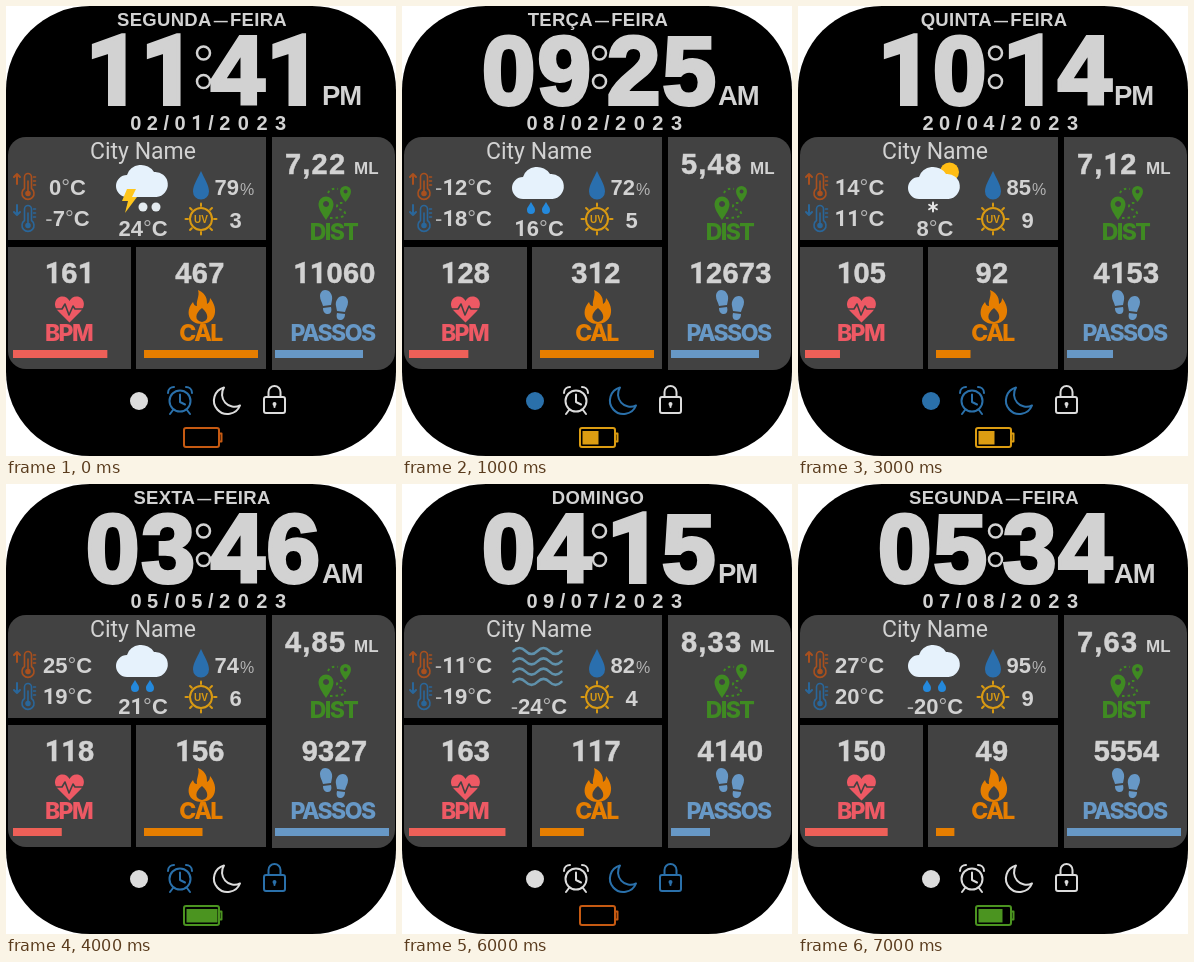
An HTML page that plays this animation: 390 px wide and 450 px high, repeating every 8 s.

```html
<!DOCTYPE html>
<html lang="pt">
<head>
<meta charset="utf-8">
<title>Watch face</title>
<style>
html, body { margin: 0; width: 100%; height: 100%; overflow: hidden; background: #fff; }
svg { display: block; width: 390px; height: 450px; }
text { font: bold 22px "Liberation Sans", Arial, sans-serif; fill: #d2d2d2; font-kerning: none; white-space: pre; }
.mid { text-anchor: middle; }
.one { font-family: Roboto, sans-serif; }
.thin { font-weight: 400; fill: #b4b4b4; }
.ask { font: 500 35px Roboto, sans-serif; }
.big { font-size: 96px; letter-spacing: 2px; stroke: #d2d2d2; stroke-width: 4px; }
.big .one, .num .one { letter-spacing: 0; }
.num { font-size: 29px; letter-spacing: .3px; stroke: #d2d2d2; stroke-width: .5px; }
.day { font-size: 18.5px; letter-spacing: .3px; font-kerning: normal; }
.dash { font-size: 14px; }
.date { font-size: 20px; letter-spacing: 5.5px; }
.year { letter-spacing: 7.5px; }
.cap { font: 800 23px Inter, sans-serif; letter-spacing: -1.6px; }
.line { fill: none; stroke-width: 2; stroke-linecap: round; stroke-linejoin: round; }
.panel { fill: #424242; }
</style>
</head>
<body>
<svg viewBox="0 0 390 450">
  <rect width="390" height="450" rx="84"/>
  <g class="panel">
    <path d="M20 131H260V234H2V149a18 18 0 0 1 18-18z"/>
    <path d="M2 241H125V363H20a18 18 0 0 1-18-18z"/>
    <path d="M130 241H260V363H130z"/>
    <path d="M266 131H371a18 18 0 0 1 18 18V346a18 18 0 0 1-18 18H266z"/>
  </g>

  <text id="day" class="day mid" x="196" y="20"></text>
  <text id="hour" class="big" x="80" y="98"></text>
  <text id="minute" class="big" x="205" y="98"></text>
  <g class="line" stroke="#d2d2d2" style="stroke-width:2.5">
    <circle cx="197.5" cy="47" r="6.5"/>
    <circle cx="197.5" cy="75.5" r="6.5"/>
  </g>
  <text id="half" x="316" y="99" style="font-size:27.5px;letter-spacing:-1px"></text>
  <text id="date" class="date mid" x="206" y="124"></text>

  <text class="mid" x="137" y="153" style="font:400 23px Roboto,sans-serif">City Name</text>
  <g class="line" stroke="#a9501e" style="stroke-width:1.6">
    <path d="M18.500 182.500V171a3.500 3.500 0 0 1 7 0V182.500a6 6 0 1 1-7 0z"/>
    <path d="M22 175V187M27.500 171h2M27.500 175h2M27.500 179h2"/>
    <circle cx="22" cy="187.500" r="2" fill="#a9501e"/>
    <path d="M11 178V168M8 171l3-3 3 3" stroke-width="2"/>
  </g>
  <g class="line" stroke="#2a6699" style="stroke-width:1.6">
    <path d="M18.500 214.500V203a3.500 3.500 0 0 1 7 0V214.500a6 6 0 1 1-7 0z"/>
    <path d="M22 207V219M27.500 203h2M27.500 207h2M27.500 211h2"/>
    <circle cx="22" cy="219.500" r="2" fill="#2a6699"/>
    <path d="M11 199V209M8 206l3 3 3-3" stroke-width="2"/>
  </g>
  <text id="high" class="mid"></text>
  <text id="low" class="mid"></text>
  <g id="sky"></g>
  <text id="now" class="mid"></text>

  <path d="M195 165C198 172 203 179 203 185.500a8 8 0 0 1-16 0C187 179 192 172 195 165z" fill="#2a6fae"/>
  <text id="humid" x="208.500" y="188.500"></text>
  <g id="sun" class="line" stroke="#d99a12"><circle cx="195" cy="213" r="11"/></g>
  <text class="mid" x="195" y="216.500" style="font-size:10px;fill:#d99a12">UV</text>
  <text id="uv" class="mid" x="229.500" y="222"></text>

  <text id="dist" class="num" x="279" y="168" style="letter-spacing:1.2px"></text>
  <text x="348" y="168" style="font-size:17px">ML</text>
  <g fill="#3f8a22" fill-rule="evenodd">
    <path d="M320 214c-4-6-7.500-11-7.500-16a7.500 7.500 0 0 1 15 0c0 5-3.500 10-7.500 16zm0-19a3 3 0 1 0 .1 0z"/>
    <path d="M339.500 196c-3-4-5.500-7-5.500-10.500a5.500 5.500 0 0 1 11 0c0 3.500-2.500 6.500-5.500 10.500zm0-12.500a2 2 0 1 0 .1 0z"/>
    <path class="line" d="M324 212c8 0 16-1 15-5s-9-3-8-7 4-3 6-3M322 187c2-4 6-5 10-4" stroke="#3f8a22" stroke-dasharray="2.500 3" style="stroke-linecap:butt"/>
    <text class="cap mid" x="327.500" y="234" style="fill:inherit">DIST</text>
  </g>

  <text id="bpm" class="num mid" x="63.500" y="276.500"></text>
  <g fill="#ee5964">
    <path d="M63.500 316.500L52 305C46 298.500 50 290.500 56.500 290.500c3.500 0 5.500 2 7 4.500c1.500-2.500 3.500-4.500 7-4.500c6.500 0 10.500 8 4.500 14.500z"/>
    <path class="line" d="M49 303h7l3-5 4 11 4-9 2 3h9" stroke="#424242" style="stroke-width:1.6"/>
    <text class="cap mid" x="62.500" y="335" style="fill:inherit">BPM</text>
  </g>
  <rect id="bpmBar" x="7" y="344" height="8" fill="#ee6058"/>

  <text id="cal" class="num mid" x="194" y="276.500"></text>
  <g fill="#e67e00">
    <path d="M192 284c9 4 9 10 9 14c2-1 3-3 3-6c9 11 6 25-8 26c-14 0-17-13-9-22c1 3 2 4 4 4c-1-6 3-10 1-16z"/>
    <path class="panel" d="M196 302c7 6 7 13 0 14c-8-1-7-9 0-14z"/>
    <text class="cap mid" x="194.500" y="335" style="fill:inherit">CAL</text>
  </g>
  <rect id="calBar" x="138" y="344" height="8" fill="#e67e00"/>

  <text id="steps" class="num mid" x="328.500" y="276.500"></text>
  <g fill="#6798c6">
    <path d="M319 284c5 0 8 5 7 10l-1 5-8 1c-1-4-3-6-3-10 0-3 2-6 5-6zM317 302l8-1c1 4 0 7-3 7s-5-2-5-6z"/>
    <path d="M337 290c-5 0-8 5-7 10l1 5 8 1c1-4 3-6 3-10 0-3-2-6-5-6zM339 308l-8-1c-1 4 0 7 3 7s5-2 5-6z"/>
    <text class="cap mid" x="326.500" y="335" style="fill:inherit">PASSOS</text>
  </g>
  <rect id="stepBar" x="269" y="344" height="8" fill="#6798c6"/>

  <circle id="radio" cx="133" cy="395" r="9"/>
  <g id="alarm" class="line">
    <circle cx="174" cy="395" r="10.500"/>
    <path d="M174 388.500V396l5 2.500M162 387c0-4 3-6 6-6M186 387c0-4-3-6-6-6M167 404l-3 4M181 404l3 4"/>
  </g>
  <path id="moon" class="line" d="M218 381.500a13.500 13.500 0 1 0 16 18a12.500 12.500 0 0 1-16-18z"/>
  <g id="lock" class="line">
    <rect x="258" y="391" width="21" height="16" rx="2"/>
    <path d="M262.500 391V386a6 6 0 0 1 12 0V391M268.500 398V401"/>
    <circle cx="268.500" cy="398" r="1"/>
  </g>
  <g id="battery">
    <rect class="line" x="178" y="422" width="35" height="19" rx="2"/>
    <path class="line" d="M213.500 427.500h2v8h-2"/>
    <rect id="charge" x="180.500" y="425" height="13.500" stroke="none"/>
  </g>
</svg>
<script>
const $ = id => document.getElementById(id);
const STEP = 1000;

// day, time, half, date, high, low, now, sky, humidity, uv, dist, bpm, cal, steps, step bar, lit icons, battery
const faces = [
  ["SEGUNDA—FEIRA", "11:41", "PM", "02/01/2023", 0, -7, 24, "storm", 79, 3, "7,22", 161, 467, 11060, 88, "0100", 0],
  ["TERÇA—FEIRA", "09:25", "AM", "08/02/2023", -12, -18, 16, "rain", 72, 5, "5,48", 128, 312, 12673, 88, "1010", 1],
  ["QUARTA—FEIRA", "08:02", "PM", "15/03/2023", null, null, null, "wave", 67, 12, "3,60", 62, 201, 5086, 99, "1111", 2],
  ["QUINTA—FEIRA", "10:14", "PM", "20/04/2023", 14, 11, 8, "snow", 85, 9, "7,12", 105, 92, 4153, 46, "1110", 1],
  ["SEXTA—FEIRA", "03:46", "AM", "05/05/2023", 25, 19, 21, "rain", 74, 6, "4,85", 118, 156, 9327, 114, "0101", 3],
  ["SABADO", "12:57", "PM", "10/06/2023", -24, -30, 34, "wave", 80, 4, "1,91", 135, 14, 14283, 114, "1001", 3],
  ["DOMINGO", "04:15", "PM", "09/07/2023", -11, -19, -24, "mist", 82, 4, "8,33", 163, 117, 4140, 39, "0011", 0],
  ["SEGUNDA—FEIRA", "05:34", "AM", "07/08/2023", 27, 20, -20, "rain", 95, 9, "7,63", 150, 49, 5554, 114, "0000", 2]
];
const cells = [["#c65a12", 0], ["#dc9d12", 16], ["#4b9420", 24], ["#4b9420", 31]];

const cloud = '<path d="M121 193a11 11 0 0 1 0-22a14.500 13 0 0 1 27-3a12.500 12.500 0 0 1 2.500 25z" fill="#e6f2fc"/>';
const drop = x => `<path d="M${x} 196c2 4 4 5 4 8a4 4 0 0 1-8 0c0-3 2-4 4-8z" fill="#2489dc"/>`;
const ball = x => `<circle cx="${x}" cy="201" r="4.500" fill="#e4ebf0"/>`;
const waves = color => [0, 1, 2, 3].map(i =>
  `<path class="line" stroke="${color}" d="M111.500 ${167 + i * 10.3}q6-6 12 0t12 0 12 0 12 0" style="stroke-width:2.5"/>`).join("");
const flake = [30, 90, 150].map(a =>
  `<path class="line" stroke="#e4e4e4" d="M130.500 201h9" transform="rotate(${a} 135 201)"/>`).join("");
const skies = {
  storm: `<g transform="translate(0 -2)">${cloud}</g><path d="M121 183h9l-4 8h5l-12 16 3-12h-6z" fill="#ffc61c"/>` + ball(137) + ball(150),
  rain: cloud + drop(129) + drop(144),
  snow: '<circle cx="151.500" cy="166" r="9.500" fill="#ffbd14"/>' + cloud + flake,
  wave: waves("#8fa8e0"),
  mist: waves("#5f91ab")
};

const span = (cls, s) => `<tspan class="${cls}">${s}</tspan>`;
// Footless figure one, whatever the surrounding face
const figures = s => String(s).replace(/1/g, span("one", 1));
const put = (id, s) => { $(id).innerHTML = figures(s); };

function temp(id, v, x, y) {
  const ask = v === null;
  $(id).setAttribute("x", ask ? x - 1.5 : x);
  $(id).setAttribute("y", ask ? y + 9.5 : y);
  $(id).innerHTML = ask ? span("ask", "?")
    : (v < 0 ? span("thin", "-") : "") + figures(Math.abs(v)) + span("thin", "°") + "C";
}

function bar(id, w) {
  $(id).setAttribute("width", Math.max(0, w));
}

function show([day, time, half, date, high, low, now, sky, humid, uv, dist, bpm, cal, steps, walked, lit, level]) {
  const [hour, minute] = time.split(":");
  Object.entries({ hour, minute, half, uv, dist, bpm, cal, steps }).forEach(e => put(...e));
  $("day").innerHTML = day.replace("—", '<tspan class="dash" dx="2">—</tspan><tspan dx="2">') + (day.includes("—") ? "</tspan>" : "");
  $("date").innerHTML = figures(date.slice(0, 6)) + span("year", date.slice(6));
  temp("high", high, 61.5, 189);
  temp("low", low, 61.5, 219.5);
  temp("now", now, 137, 230);
  $("humid").innerHTML = figures(humid) + '<tspan class="thin" dx="1" style="font-size:16px">%</tspan>';
  $("sky").innerHTML = skies[sky];
  bar("bpmBar", (bpm - 72) * 1.06);
  bar("calBar", Math.min(114, cal * .375));
  bar("stepBar", walked);
  ["radio", "alarm", "moon", "lock"].forEach((id, i) => {
    const color = lit[i] === "1" ? "#2a70aa" : "#dcdcdc";
    $(id).setAttribute(id === "radio" ? "fill" : "stroke", color);
  });
  const [color, width] = cells[level];
  $("battery").setAttribute("stroke", color);
  $("charge").setAttribute("fill", color);
  bar("charge", width);
}

for (let a = 0; a < 360; a += 45)
  $("sun").insertAdjacentHTML("beforeend", `<path d="M195 200v-2.500" transform="rotate(${a} 195 213)"/>`);

const start = performance.now();
let shown = -1;
function tick() {
  const i = Math.floor((performance.now() - start) / STEP) % faces.length;
  if (i !== shown) show(faces[shown = i]);
  requestAnimationFrame(tick);
}
tick();
</script>
</body>
</html>
```
